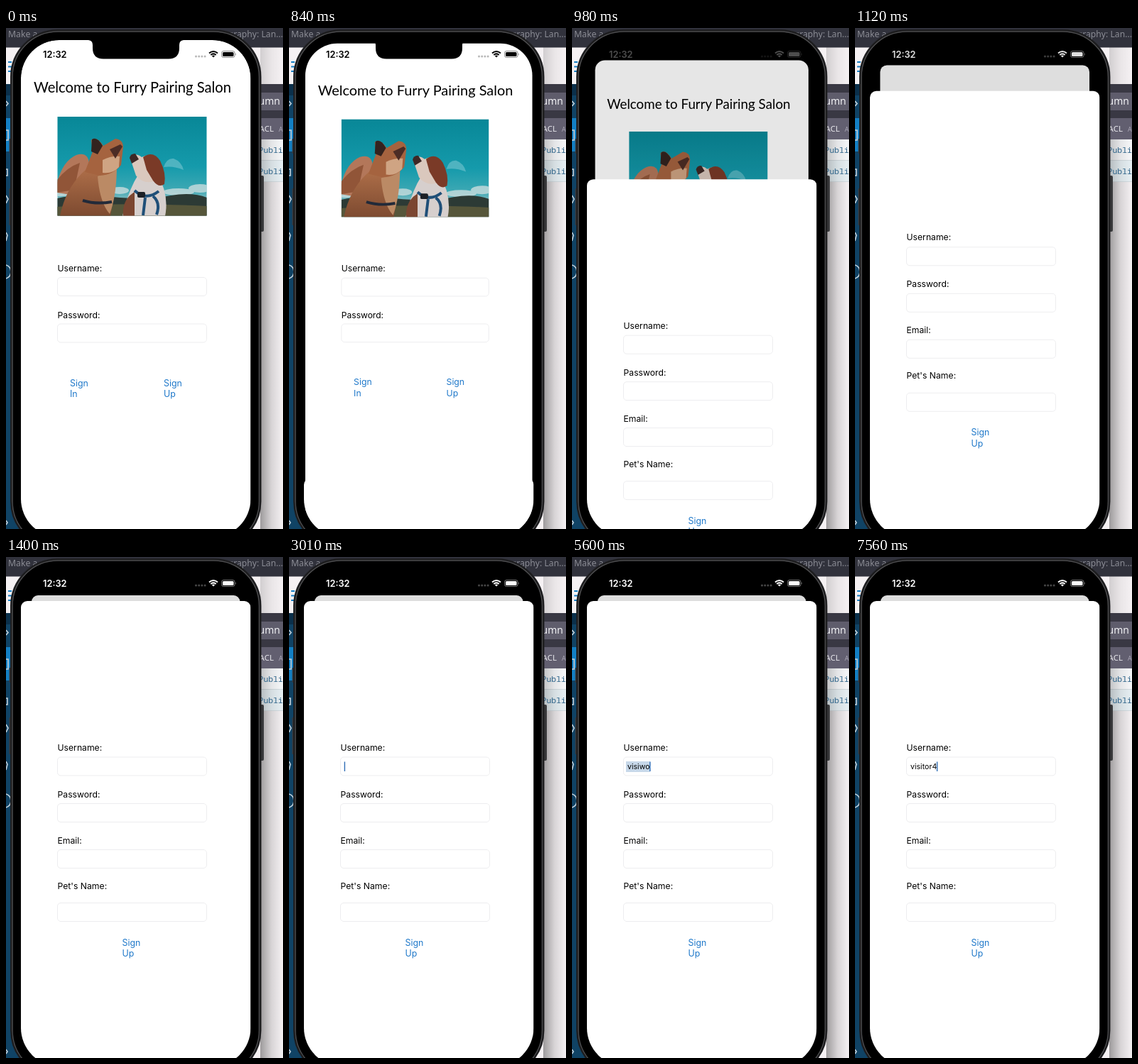
These frames come from a looping animation (390 by 706 pixels, 8000 ms). An HTML page:

```html
<!DOCTYPE html>
<html lang="en">
<head>
<meta charset="utf-8">
<title>Sign up flow</title>
<style>
  html, body { margin: 0; width: 100%; height: 100%; overflow: hidden; background: #fff; }
  svg { display: block; width: 390px; height: 706px; }
  text { font-family: Inter, "Open Sans", sans-serif; font-size: 12.2px; white-space: pre; }
  .title { font-family: Lato, sans-serif; font-size: 20.2px; text-anchor: middle; }
  .link text { fill: #2079ca; font-size: 12.4px; }
  .side { font-family: "Noto Sans", sans-serif; }
  .code { font-family: "Noto Sans Mono", monospace; font-size: 11.5px; fill: #2c6288; }
  .field { fill: none; stroke: #ededef; }
  #typed { font-size: 10.6px; }
</style>
</head>
<body>
<svg viewBox="0 0 390 706">
  <defs>
    <clipPath id="screenClip"><rect x="21" y="17" width="323.500" height="700.500" rx="54"/></clipPath>
    <clipPath id="photoClip"><rect x="72.500" y="125" width="210" height="139.500"/></clipPath>
    <linearGradient id="sky" x2="0" y2="1">
      <stop offset="0" stop-color="#088797"/>
      <stop offset=".5" stop-color="#159aab"/>
      <stop offset=".75" stop-color="#3fa9b4"/>
      <stop offset=".85" stop-color="#8fbfc4"/>
    </linearGradient>
    <linearGradient id="fur" x2="0" y2="1">
      <stop offset="0" stop-color="#b0704a"/>
      <stop offset="1" stop-color="#7d4a30"/>
    </linearGradient>
    <linearGradient id="shade">
      <stop offset="0" stop-color="#000" stop-opacity=".36"/>
      <stop offset=".5" stop-color="#000" stop-opacity=".12"/>
      <stop offset="1" stop-color="#000" stop-opacity="0"/>
    </linearGradient>
  </defs>

  <!-- desktop behind the phone -->
  <rect width="390" height="706" fill="#f5f1f3"/>
  <rect y="79" width="60" height="627" fill="#104365"/>
  <rect y="79" width="60" height="16" fill="#0b304b"/>
  <rect y="127" width="60" height="47" fill="#137fc4"/>
  <path d="M3 48H8M3 54.500H8M3 61H8" stroke="#1680c6" stroke-width="2"/>
  <path d="M0 103L3 106.500L0 110M0 144H3V158H0M0 199H2V208H0M0 236L3 241L0 247M0 288L2 292L0 300M0 334A10 10 0 0 1 0 353M0 694L2 697L0 700"
    fill="none" stroke="#c3d2dd" stroke-width="1.600"/>
  <rect x="300" y="79" width="90" height="48" fill="#393843"/>
  <rect x="300" y="91" width="96" height="25" rx="4" fill="#5f5d6c"/>
  <rect x="300" y="127" width="90" height="30" fill="#625f70"/>
  <rect x="300" y="157" width="90" height="30" fill="#f6f7f9"/>
  <rect x="300" y="187" width="90" height="29" fill="#e6eff3"/>
  <path d="M300 186.500H390M300 216.500H390" stroke="#d2dadf"/>
  <rect x="358" y="27" width="32" height="52" fill="url(#shade)" opacity=".4"/>
  <rect x="358" y="157" width="32" height="60" fill="url(#shade)" opacity=".6"/>
  <rect x="358" y="217" width="32" height="489" fill="url(#shade)"/>
  <rect width="390" height="27.500" fill="#31323c"/>
  <circle cx="137" cy="6" r="4" fill="#1795ad"/>
  <text class="side" x="3" y="13" fill="#8b8c95">Make a</text>
  <text class="side" x="390" y="13" fill="#8b8c95" text-anchor="end">Geography: Lan...</text>
  <text class="side" x="386" y="108" fill="#f1f1f4" style="font-size:14px" text-anchor="end">Column</text>
  <text class="side" x="377" y="146" fill="#e6e5ea" style="font-size:11.500px" text-anchor="end">ACL</text>
  <text class="side" x="384" y="146" fill="#aaa7b5" style="font-size:9px">A</text>
  <text class="code" x="355.500" y="176">Public</text>
  <text class="code" x="355.500" y="206">Public</text>

  <!-- phone body -->
  <g fill="#38383a">
    <rect x="4.500" y="156" width="4" height="21" rx="1"/>
    <rect x="4.500" y="226" width="4" height="52" rx="1"/>
    <rect x="357" y="208" width="6" height="79" rx="2"/>
  </g>
  <rect x="7" y="3" width="351.500" height="730" rx="66" stroke="#1e1e20" stroke-width="2"/>
  <rect x="9" y="5" width="347.500" height="726" rx="64" stroke="#505052" stroke-width="1.500"/>

  <g clip-path="url(#screenClip)">
    <rect x="21" y="17" width="323.500" height="703"/>
    <g id="card">
      <rect id="cardBg" x="21" y="17" width="323.500" height="760" fill="#fff"/>
      <text class="title" x="178" y="91">Welcome to Furry Pairing Salon</text>
      <g clip-path="url(#photoClip)">
        <rect x="72" y="125" width="211" height="140" fill="url(#sky)"/>
        <path d="M222 196Q226 183 236 184Q247 188 250 200Q236 194 222 196Z" fill="#69bfca" opacity=".7"/>
        <g fill="#d5e0e0" opacity=".75">
          <ellipse cx="243" cy="231" rx="22" ry="5"/>
          <ellipse cx="273" cy="226" rx="16" ry="6"/>
          <ellipse cx="160" cy="229" rx="13" ry="5"/>
          <ellipse cx="78" cy="233" rx="14" ry="4"/>
        </g>
        <path d="M72 240Q100 233 150 238T232 236Q262 231 283 239V265H72Z" fill="#2c3a35"/>
        <path d="M72 252Q160 245 283 251V265H72Z" fill="#56563a"/>
        <path d="M72 218Q80 187 99 179Q115 174 117 190L110 238L72 232Z" fill="#b3775a"/>
        <path d="M72 214Q86 196 104 190L96 228L72 232Z" fill="#915538"/>
        <path d="M76 265Q84 224 113 199L151 195Q154 229 147 265Z" fill="url(#fur)"/>
        <path d="M129 209Q149 202 156 193Q156 236 146 262Q132 246 129 209Z" fill="#bb8a65"/>
        <path d="M111 203L122 174L120 158Q127 151 137 166L154 156Q165 157 165 168L162 193Q151 207 132 208Z" fill="#a5633f"/>
        <path d="M136 186Q148 180 160 181L159 196Q150 206 136 204Z" fill="#cfa483"/>
        <path d="M120 174L121 157Q128 152 136 166L129 178Z" fill="#33231f"/>
        <path d="M146 171L161 164L164 167L154 184Z" fill="#4c2c25"/>
        <path d="M108 243Q127 249 149 245" fill="none" stroke="#222a39" stroke-width="4"/>
        <path d="M164 265Q172 229 186 207L213 205Q230 235 224 265Z" fill="#d6cfcd"/>
        <path d="M175 184Q182 174 191 182Q207 174 215 189L211 215Q195 222 183 208Z" fill="#dac8bd"/>
        <path d="M193 182Q207 172 217 187Q226 205 223 220Q215 226 207 215L198 200Z" fill="#7a3a27"/>
        <path d="M174 183Q175 177 182 177L187 185L177 191Z" fill="#3d2826"/>
        <path d="M165 265Q163 242 181 231L181 265Z" fill="#7b4631"/>
        <path d="M181 229Q197 244 215 230M196 239L193 264M207 237Q218 246 212 263" fill="none" stroke="#1f4f78" stroke-width="4"/>
        <rect x="185" y="231" width="11" height="8" rx="2" fill="#1c2026"/>
      </g>
      <g id="loginForm"></g>
      <rect id="dim" x="21" y="17" width="323.500" height="760"/>
    </g>
    <g id="status">
      <text x="52" y="41.500" style="font-weight:600;font-size:12.800px">12:32</text>
      <g opacity=".28">
        <circle cx="267.500" cy="40" r="1.500"/><circle cx="271.700" cy="40" r="1.500"/>
        <circle cx="275.900" cy="40" r="1.500"/><circle cx="280.100" cy="40" r="1.500"/>
      </g>
      <path class="ink" d="M286 35.600Q292 30.500 298 35.600M288.300 38Q292 34.700 295.700 38" fill="none" stroke-width="2"/>
      <path d="M289.800 39.300Q292 37.600 294.200 39.300L292 41.600Z"/>
      <rect class="ink" x="303.500" y="32.500" width="18.500" height="9" rx="2.700" fill="none" opacity=".45"/>
      <rect x="305" y="34" width="15.500" height="6" rx="1.500"/>
      <path d="M323 35.300Q324.700 37 323 38.700Z" opacity=".5"/>
    </g>
    <g id="sheet">
      <rect x="21" y="62" width="323.500" height="700" rx="9" fill="#fff"/>
      <g id="signupForm"></g>
      <rect id="mark" x="76" y="288" height="15" fill="#c7d8e9"/>
      <text id="typed" x="78" y="299"></text>
      <rect id="caret" y="288.500" width="1.400" height="13.500" fill="#2f6db5"/>
    </g>
  </g>
  <path d="M116 16V17Q122 17.500 122 24V28Q122 43.500 137 43.500H229Q244 43.500 244 28V24Q244 17.500 250 17V16Z"/>
</svg>

<script>
const LOOP = 8000, STEP = 70;
const $ = id => document.getElementById(id);
const mix = (a, b, p) => a + (b - a) * p;
const clamp = v => Math.max(0, Math.min(1, v));

const field = (label, y, boxY) =>
  `<text x="72.500" y="${y}">${label}</text>
   <rect class="field" x="72.500" y="${boxY}" width="210" height="26" rx="4.500"/>`;
const link = (x, y, word, id) =>
  `<g class="link" id="${id}"><text x="${x}" y="${y}">Sign</text><text x="${x}" y="${y + 15.5}">${word}</text></g>`;

$('loginForm').innerHTML =
  field('Username:', 342.5, 351.5) + field('Password:', 408.5, 417) +
  link(90, 504.5, 'In', 'signIn') + link(222, 504.5, 'Up', 'signUp');
$('signupForm').innerHTML =
  field('Username:', 272.5, 282) + field('Password:', 338.5, 347.5) +
  field('Email:', 403.5, 412.5) + field("Pet's Name:", 467.5, 487.5) +
  link(163.5, 547.5, 'Up', 'send');

// [time, text, caret opacity, selected]
const keys = [
  [0, '', 0], [3010, '', 1], [3570, '', .65], [3640, '', .3], [3710, '', 0],
  [3990, '', .5], [4060, '', .85], [4130, 'vi', 1], [4340, 'vis', 1], [4480, 'visi', 1],
  [5040, 'visi', .65], [5110, 'visi', .3], [5180, 'visi', 0],
  [5250, 'visiw', 1], [5460, 'visiwo', 1], [5600, 'visiwo', 1, true],
  [6020, 'visi', 1], [6230, 'visit', 1], [6650, 'visito', 1],
  [7280, 'visito', .6], [7350, 'visitor', 1], [7560, 'visitor4', 1]
];

// critically damped spring that lifts the sheet
function lift(t) {
  if (t < 800) return 0;
  if (t >= 1400) return 1;
  const u = (t - 800) * .0156;
  return 1 - (1 + u) * Math.exp(-u);
}

function drawSheet(t) {
  const p = lift(t), scale = mix(1, .907, p), top = mix(17, 54, p);
  $('card').setAttribute('transform',
    `translate(182.75 ${top}) scale(${scale}) translate(-182.75 -17)`);
  const radius = 10 + 44 * Math.pow(1 - p, 1.5);
  for (const id of ['cardBg', 'dim']) $(id).setAttribute('rx', radius);
  $('dim').setAttribute('opacity', .135 * clamp(1.2 * p - .2));
  $('sheet').setAttribute('transform', `translate(0 ${mix(658, 0, p)})`);

  const v = Math.round(255 * clamp((p - .67) / .33)), ink = `rgb(${v},${v},${v})`;
  $('status').setAttribute('fill', ink);
  document.querySelectorAll('.ink').forEach(e => e.setAttribute('stroke', ink));
  $('signUp').setAttribute('opacity', t >= 700 && t < 840 ? (t < 770 ? .35 : .6) : 1);
}

function drawTyping(t) {
  const [, text, alpha, selected] = keys.filter(k => k[0] <= t).pop();
  const typed = $('typed');
  typed.textContent = text;
  const end = 78 + (text ? typed.getComputedTextLength() : 0);
  $('caret').setAttribute('x', end - .3);
  $('caret').setAttribute('opacity', alpha);
  $('mark').setAttribute('width', selected ? end - 75.5 : 0);
}

function draw(ms) {
  const t = Math.floor((ms % LOOP) / STEP) * STEP;
  drawSheet(t);
  drawTyping(t);
}

const start = performance.now();
function tick() {
  draw(performance.now() - start);
  requestAnimationFrame(tick);
}
tick();
</script>
</body>
</html>
```
